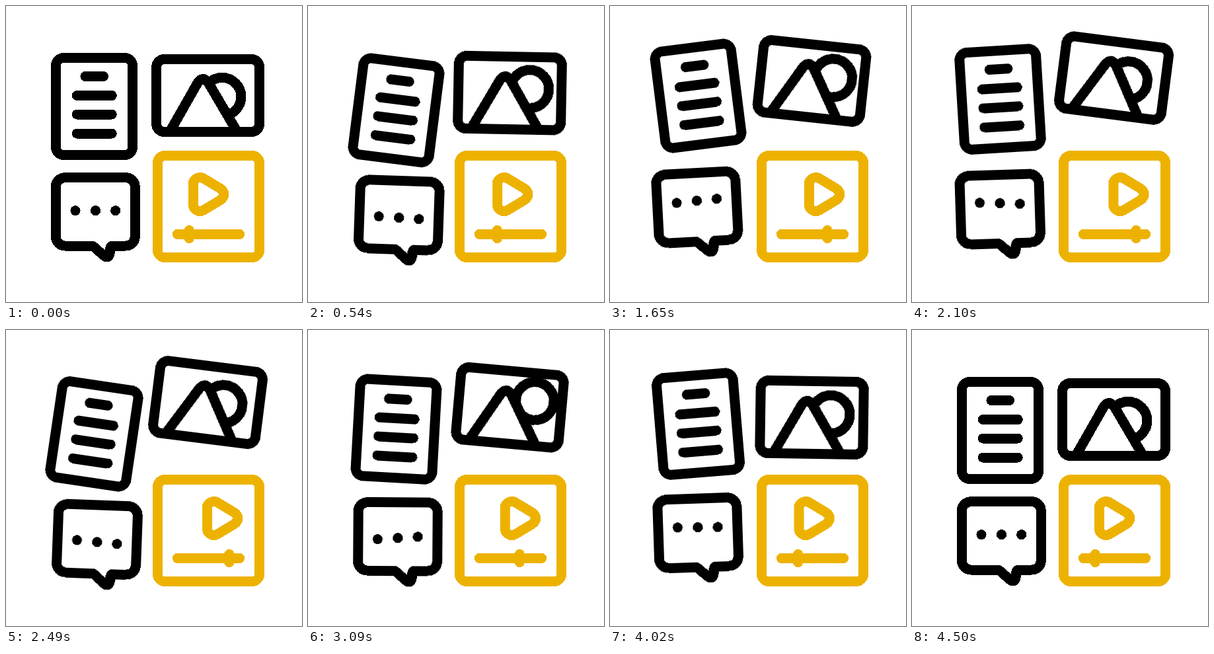
Recreate the animation shown at these times as an HTML page without scripts. Size 448 px wide and 448 px high, loop 4530 ms.

```html
<!DOCTYPE html>
<html lang="en">
<head>
<meta charset="utf-8">
<title>Content types</title>
<style>
  html, body { margin: 0; width: 100%; height: 100%; overflow: hidden; background: #fff; }
  svg { display: block; width: 100%; height: 100%; shape-rendering: crispEdges; }

  .ink { fill: none; stroke: #000; stroke-width: 15; stroke-linecap: round; stroke-linejoin: round; }
  .accent { stroke: #edb200; }
  .dot { fill: #000; stroke: none; }
  .hill { fill: #fff; }

  .move {
    animation: 4530ms cubic-bezier(.333, 0, .667, 1) infinite;
  }
  .page { animation-name: page; transform-origin: 133.5px 152px; }
  .photo { animation-name: photo; transform-origin: 305.5px 135.5px; }
  .bubble { animation-name: bubble; transform-origin: 150px 380px; }
  .sun { animation-name: sun; }
  .play { animation-name: play; }
  .knob { animation-name: knob; }
  .dot1 { animation-name: dot1; }
  .dot2 { animation-name: dot2; }
  .dot3 { animation-name: dot3; }

  /* Motion fills 4500 ms (99.338%), then rests for the last 30 ms. */
  @keyframes page {
    0%, 99.338%, 100% { transform: none; }
    19.868%, 59.603% { transform: translateY(9px) rotate(11.1deg); }
    39.735%, 79.47% { transform: translateY(-18px) rotate(-8.6deg); }
  }
  @keyframes bubble {
    0%, 99.338%, 100% { transform: none; }
    19.868%, 59.603% { transform: translateY(8.3px) rotate(3deg); }
    39.735%, 79.47% { transform: translateY(-9px) rotate(-3.5deg); }
  }
  @keyframes photo {
    0%, 99.338%, 100% { transform: none; }
    49.669% { transform: translateY(-26.8px) rotate(7.4deg); }
  }
  @keyframes sun {
    0%, 49.669%, 99.338%, 100% { transform: none; }
    24.834%, 74.503% { transform: translate(18.2px, -17.5px); }
  }
  @keyframes play {
    0%, 99.338%, 100% { transform: none; }
    49.669% { transform: translateX(21.7px); }
  }
  @keyframes knob {
    0%, 99.338%, 100% { transform: none; }
    49.669% { transform: translateX(62.6px); }
  }
  /* The dots swing one after another, 60 ms apart, right to left. */
  @keyframes dot3 {
    0%, 99.338%, 100% { transform: none; }
    19.868%, 59.603% { transform: translateY(10.5px); }
    39.735%, 79.47% { transform: translateY(-11px); }
  }
  @keyframes dot2 {
    0%, 1.325%, 99.338%, 100% { transform: none; }
    21.192%, 60.927% { transform: translateY(10.5px); }
    41.06%, 80.795% { transform: translateY(-11px); }
  }
  @keyframes dot1 {
    0%, 2.649%, 99.338%, 100% { transform: none; }
    22.517%, 62.252% { transform: translateY(10.5px); }
    42.384%, 82.119% { transform: translateY(-11px); }
  }
</style>
</head>
<body>
<svg viewBox="0 0 448 448">
  <g class="ink">
    <g class="move page">
      <rect x="75.4" y="78.5" width="116.2" height="147" rx="12"/>
      <path d="M120 106.5H147.5M107.3 135.5H160.3M107.3 164H160.3M107.3 193H160.3"/>
    </g>

    <g class="move photo">
      <circle class="move sun" cx="327" cy="137.3" r="28.9"/>
      <path class="hill" d="M249.2 188L290 116.5Q298.3 104.5 306.5 116.5L348.5 188"/>
      <rect x="227.7" y="80.5" width="155.8" height="110" rx="12"/>
    </g>

    <g class="move bubble">
      <path d="M89.3 259.7H181.3A14 14 0 0 1 195.3 273.7V349A14 14 0 0 1 181.3 363H162Q158 363 157.6 367L157 375Q155 382.5 149 378.5L133.5 365Q131 363 128 363H89.3A14 14 0 0 1 75.3 349V273.7A14 14 0 0 1 89.3 259.7Z"/>
      <g class="dot">
        <circle class="move dot1" cx="105" cy="309.7" r="7.6"/>
        <circle class="move dot2" cx="135.5" cy="309.7" r="7.6"/>
        <circle class="move dot3" cx="165.7" cy="309.7" r="7.6"/>
      </g>
    </g>
  </g>

  <g class="ink accent">
    <rect x="229.5" y="226.5" width="154" height="154" rx="11"/>
    <path class="move play" d="M283.2 270A10.5 10.5 0 0 1 299 261L324.8 276.5A10 10 0 0 1 324.8 293.5L299 309A10.5 10.5 0 0 1 283.2 300Z"/>
    <path d="M259.3 345.4H353.7"/>
    <path class="move knob" d="M277.2 339.3V351.7"/>
  </g>
</svg>
</body>
</html>
```
